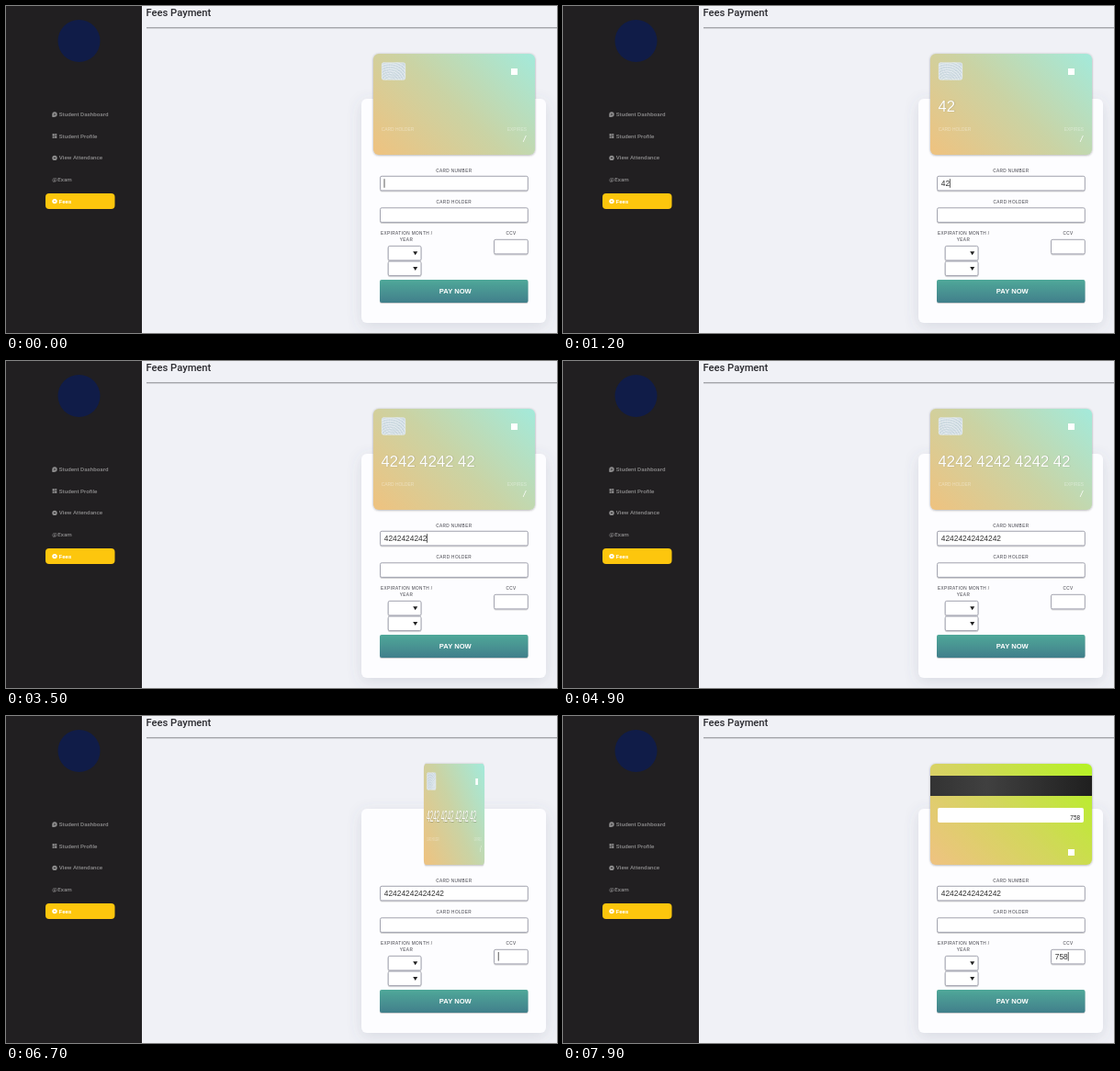
Recreate the animation shown at these times as an HTML page. Size 600 px wide and 356 px high, loop 8 s.

```html
<!DOCTYPE html>
<html lang="en">
<head>
<meta charset="utf-8">
<title>Fees Payment</title>
<style>
  html, body { margin: 0; width: 100%; height: 100%; overflow: hidden; background: #f0f1f6; }
  svg { display: block; width: 100vw; height: 100vh; }
  .ui { font-family: Roboto, sans-serif; }
  .form { font-family: "Liberation Sans", Arial, sans-serif; }
  .nav { font-size: 6.25px; font-weight: 500; fill: #8d8c8d; }
  .label { font-size: 4.7px; letter-spacing: .4px; fill: #3c3c44; text-anchor: middle; }
  .box { fill: #fff; stroke: #a3a4b0; stroke-width: 1; }
  .value { font-size: 8.4px; fill: #333; }
  .faint { font-size: 4.9px; fill: #fff; opacity: .42; }
</style>
</head>
<body>
<svg viewBox="0 0 600 356" preserveAspectRatio="none">
  <defs>
    <linearGradient id="front" gradientUnits="userSpaceOnUse" x1="417" y1="179" x2="559" y2="35">
      <stop offset="0" stop-color="#efc27f"/>
      <stop offset=".5" stop-color="#cad3a4"/>
      <stop offset="1" stop-color="#a3eadb"/>
    </linearGradient>
    <linearGradient id="back" gradientUnits="userSpaceOnUse" x1="417" y1="179" x2="559" y2="35">
      <stop offset="0" stop-color="#efc282"/>
      <stop offset=".5" stop-color="#d2d75b"/>
      <stop offset="1" stop-color="#b4f323"/>
    </linearGradient>
    <linearGradient id="stripe">
      <stop offset="0" stop-color="#333"/>
      <stop offset=".35" stop-color="#404040"/>
      <stop offset="1" stop-color="#1f1f1f"/>
    </linearGradient>
    <linearGradient id="pay" x2="0" y2="1">
      <stop offset="0" stop-color="#50a899"/>
      <stop offset="1" stop-color="#417f8b"/>
    </linearGradient>
    <filter id="soft" x="-20%" y="-20%" width="140%" height="140%">
      <feDropShadow dx="0" dy="4" stdDeviation="8" flood-color="#5a5f78" flood-opacity=".16"/>
    </filter>
    <filter id="edge" x="-10%" y="-10%" width="120%" height="120%">
      <feDropShadow dx="0" dy=".5" stdDeviation="1.1" flood-color="#333" flood-opacity=".45"/>
    </filter>
    <filter id="lift" x="-10%" y="-40%" width="120%" height="180%">
      <feDropShadow dx="0" dy=".8" stdDeviation=".7" flood-color="#333" flood-opacity=".3"/>
    </filter>
    <clipPath id="chipClip"><rect x="409" y="61.5" width="26" height="19" rx="2.5"/></clipPath>
  </defs>

  <rect width="600" height="356" fill="#f0f1f6"/>
  <g class="ui">
    <rect width="148" height="356" fill="#211f21"/>
    <circle cx="79.5" cy="38" r="23" fill="#101c48"/>
    <rect x="43" y="204" width="75.5" height="17" rx="4" fill="#fdc60d"/>
    <g id="menu"></g>
    <text x="152.5" y="11.3" font-size="11.2" font-weight="500" fill="#2b2b30">Fees Payment</text>
    <rect x="153" y="23.3" width="447" height="1" fill="#85858a"/>
  </g>

  <g class="form">
    <rect x="387" y="101" width="201" height="244" rx="6" fill="#fdfdff" filter="url(#soft)"/>
    <text class="label" x="487.8" y="180.5">CARD NUMBER</text>
    <text class="label" x="487.8" y="215">CARD HOLDER</text>
    <text class="label" x="436.2" y="249">EXPIRATION MONTH /</text>
    <text class="label" x="436" y="256">YEAR</text>
    <text class="label" x="550" y="249">CCV</text>
    <g id="boxes" filter="url(#lift)"></g>
    <path d="M443.2 267.3h5l-2.5 4zM443.2 284h5l-2.5 4z" fill="#222"/>
    <text class="value" id="number" x="411.8" y="196"></text>
    <text class="value" id="ccv" x="535.8" y="264.7"></text>
    <rect id="caret" width=".8" height="9.6" fill="#333"/>
    <rect x="407" y="298" width="161.5" height="25" rx="2" fill="url(#pay)" filter="url(#lift)"/>
    <text x="489.3" y="313.2" font-size="7.6" font-weight="700" text-anchor="middle" fill="#fff">PAY NOW</text>
  </g>

  <g id="card" class="form">
    <g id="faceFront">
      <rect x="400" y="52" width="176" height="110" rx="6" fill="url(#front)" filter="url(#edge)"/>
      <g clip-path="url(#chipClip)">
        <rect x="409" y="61.5" width="26" height="19" fill="#cfdce0"/>
        <g id="waves" fill="none" stroke="#f4f6fb" stroke-width=".7"></g>
      </g>
      <rect x="409.3" y="61.8" width="25.4" height="18.4" rx="2.2" fill="none" stroke="#e6ebee" stroke-width=".7"/>
      <rect x="550" y="68" width="7" height="7" fill="#fff"/>
      <text id="cardNumber" x="408.6" y="114.6" font-size="16.7" fill="#fff" style="text-shadow:.5px .7px 1px rgba(80,80,60,.35)"></text>
      <text class="faint" x="408.8" y="135.8">CARD HOLDER</text>
      <text class="faint" x="567" y="135.8" text-anchor="end">EXPIRES</text>
      <text x="563.2" y="148.2" font-size="9.5" font-style="italic" fill="#fff">/</text>
    </g>
    <g id="faceBack">
      <rect x="400" y="52" width="176" height="110" rx="6" fill="url(#back)" filter="url(#edge)"/>
      <rect x="400" y="65" width="176" height="22" fill="url(#stripe)"/>
      <rect x="408" y="100" width="159" height="16" rx="2" fill="#fff"/>
      <text id="cardCcv" x="563" y="112.6" font-size="6.4" text-anchor="end" fill="#222"></text>
      <rect x="550" y="145" width="7" height="7" fill="#fff"/>
    </g>
  </g>
</svg>
<script>
const LOOP = 8000;
const DIGITS = "42424242424242", CODE = "758";
const FIRST_KEY = 700, KEY_GAP = 285;
const CODE_KEYS = [6830, 7230, 7580];
const BLUR = 4500, FOCUS_CCV = 6550, FLIP = 400;

const $ = id => document.getElementById(id);
function add(parent, tag, attrs, text) {
  const el = document.createElementNS("http://www.w3.org/2000/svg", tag);
  for (const key in attrs) el.setAttribute(key, attrs[key]);
  if (text) el.textContent = text;
  return $(parent).appendChild(el);
}

// label, baseline, text x, icon shape
[
  ["Student Dashboard", 120, 57.8, "bubble"],
  ["Student Profile", 143.6, 57.8, "grid"],
  ["View Attendance", 167.4, 57.8, "dot"],
  ["Exam", 191, 56.3, "at"],
  ["Fees", 214.6, 57.8, "dot"]
].forEach(([name, y, x, icon]) => {
  const on = name === "Fees";
  const fill = on ? "#fff" : "#8d8c8d", hole = on ? "#fdc60d" : "#211f21";
  const cy = y - 2;
  add("menu", "text", { class: "nav", x, y, style: on ? "fill:#fff;font-weight:700" : "" }, name);
  if (icon === "at") {
    add("menu", "text", { class: "nav", x: 50.2, y: y - .3 }, "@");
  } else if (icon === "grid") {
    for (const [dx, dy, h] of [[0, 0, 2.8], [2.6, 0, 1.7], [0, 3.3, 1.7], [2.6, 2.2, 2.8]])
      add("menu", "rect", { x: 50.6 + dx, y: cy - 2.6 + dy, width: 2.1, height: h, fill });
  } else {
    add("menu", "circle", { cx: 53, cy, r: 2.7, fill });
    if (icon === "bubble") add("menu", "path", { d: `M50.4 ${cy}v3h3z`, fill });
    add("menu", "path", { d: `M52 ${cy}h2`, stroke: hole, "stroke-width": .9 });
  }
});

[
  [407, 185, 161], [407, 219.5, 161], [415.7, 261, 36], [415.7, 277.7, 36], [531, 254, 37]
].forEach(([x, y, width]) =>
  add("boxes", "rect", { class: "box", x: x + .5, y: y + .3, width: width - .2, height: 15.6, rx: 1.6 }));

for (let i = 0; i < 9; i++) {
  add("waves", "circle", { cx: 418, cy: 84, r: 3 + i * 2.6 });
  add("waves", "circle", { cx: 427, cy: 66, r: 2 + i * 2.6, stroke: "#b9c4dc", "stroke-width": .4 });
}

function draw(t) {
  const count = Math.max(0, Math.min(DIGITS.length, Math.floor((t - FIRST_KEY) / KEY_GAP) + 1));
  const number = DIGITS.slice(0, count);
  const code = CODE.slice(0, CODE_KEYS.filter(k => t >= k).length);
  $("number").textContent = number;
  $("cardNumber").textContent = number.replace(/(.{4})(?=.)/g, "$1 ");
  $("ccv").textContent = $("cardCcv").textContent = code;

  const inCcv = t >= FOCUS_CCV;
  const field = $(inCcv ? "ccv" : "number");
  const caret = $("caret");
  caret.setAttribute("x", (inCcv ? 535.8 : 411.6) + (field.textContent ? field.getComputedTextLength() : 0));
  caret.setAttribute("y", inCcv ? 257 : 188.2);
  caret.style.display = t < BLUR || inCcv ? "" : "none";

  const turn = Math.max(0, Math.min(1, (t - FOCUS_CCV) / FLIP));
  const cos = Math.cos(turn * Math.PI);
  $("card").setAttribute("transform", `translate(488 0) scale(${Math.max(.002, Math.abs(cos))} 1) translate(-488 0)`);
  $("faceFront").style.display = cos >= 0 ? "" : "none";
  $("faceBack").style.display = cos < 0 ? "" : "none";
}

const start = performance.now();
function tick() {
  draw((performance.now() - start) % LOOP);
  requestAnimationFrame(tick);
}
draw(0);
requestAnimationFrame(tick);
</script>
</body>
</html>
```
